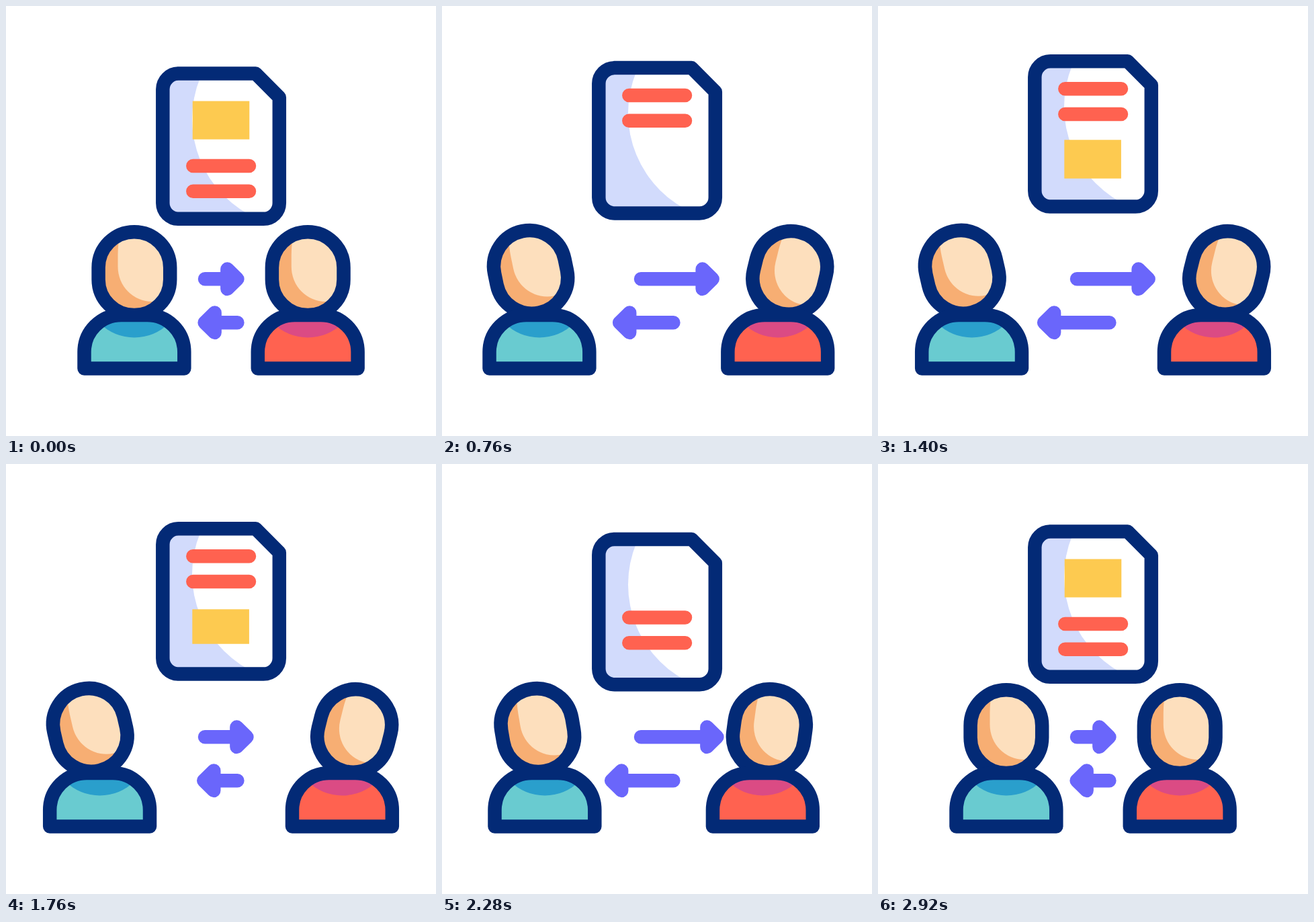
Write an HTML page that moves like this. It is 640 px wide and 640 px high and loops after 3 s.

```html
<!DOCTYPE html>
<html lang="en">
<head>
<meta charset="utf-8">
<title>Document exchange</title>
<style>
  html, body { margin: 0; height: 100%; overflow: hidden; background: #fff; }
  svg { display: block; width: 100vw; height: 100vh; }
  .line { fill: none; stroke: #032a76; stroke-width: 20.5; stroke-linejoin: round; }
  .bar { stroke: #ff6250; stroke-width: 20.5; stroke-linecap: round; }
  .arrow { fill: #6a66fb; stroke: #6a66fb; stroke-width: 20.5; stroke-linecap: round; stroke-linejoin: round; }
  .box { fill: #fdca50; }
</style>
</head>
<body>
<svg viewBox="0 0 640 640">
  <defs>
    <path id="page" d="M256.8 100.5H371.5L406.8 136V293.3a23.5 23.5 0 0 1-23.5 23.5H256.8a23.5 23.5 0 0 1-23.5-23.5V124a23.5 23.5 0 0 1 23.5-23.5Z"/>
    <rect id="skull" x="137.6" y="336.2" width="106.6" height="124" rx="53.3"/>
    <path id="torso" d="M116.5 539.5V515a55 55 0 0 1 55-55H210.3a55 55 0 0 1 55 55V539.5Z"/>
    <clipPath id="pageClip"><use href="#page"/></clipPath>
    <clipPath id="skullClip"><use href="#skull"/></clipPath>
    <clipPath id="torsoClip"><use href="#torso"/></clipPath>
    <g id="head">
      <use href="#skull" fill="#f7ae73"/>
      <path d="M170 335Q166.5 355 166.5 370V388a51 52 0 0 0 51 52H250V335Z" fill="#fddfbd" clip-path="url(#skullClip)"/>
      <use href="#skull" class="line"/>
    </g>
  </defs>

  <g id="doc">
    <use href="#page" fill="#d2dbfc"/>
    <circle cx="439" cy="168" r="162" fill="#fff" clip-path="url(#pageClip)"/>
    <use href="#page" class="line"/>
    <rect id="topBox" class="box" x="277.7" y="141.5" width="84.6" height="57"/>
    <rect id="lowBox" class="box" x="277.3" width="84.6"/>
    <path id="bars" class="bar" d="M278.3 238H362M278.3 275.7H362"/>
  </g>
  <g id="people"></g>
  <path id="rightArrow" class="arrow"/>
  <path id="leftArrow" class="arrow"/>
</svg>
<script>
const LOOP = 3000, STEP = 40;
const $ = id => document.getElementById(id);

const people = [
  { home: 0, shift: -51.3, tilt: -13, pivot: '173 460', out: 280, back: 2080, shirt: '#69cbd0', shade: '#2a9fcc' },
  { home: 258.3, shift: 51.2, tilt: 14, pivot: '205 472', out: 200, back: 2000, shirt: '#ff6250', shade: '#db4b84' }
];

$('people').innerHTML = people.map(p => `<g>
  <use href="#head"/>
  <use href="#torso" fill="${p.shirt}"/>
  <circle cx="191" cy="420.5" r="73" fill="${p.shade}" clip-path="url(#torsoClip)"/>
  <use href="#torso" class="line"/>
</g>`).join('');
people.forEach((p, i) => {
  p.group = $('people').children[i];
  p.head = p.group.firstElementChild;
});

// Eased 0..1 progress of a move.
function ease(t, start, duration) {
  const p = Math.min(1, Math.max(0, (t - start) / duration));
  return p * p * (3 - 2 * p);
}

// Goes to 1 at `out` and returns to 0 at `back`.
const visit = (t, out, back, duration) => ease(t, out, duration) - ease(t, back, duration);

// Three out-and-back strokes of 800 ms.
function pulse(t, start) {
  const local = t - start;
  if (local < 0 || local >= 2400) return 0;
  return visit(local % 800, 0, 400, 400);
}

function arrow(tail, y, tip, dir) {
  const base = tip - 15 * dir;
  return `M${tail} ${y}H${base}M${base} ${y - 14.7}V${y + 14.7}L${tip} ${y}Z`;
}

function draw(t) {
  const lift = -18.2 * ease(t, 400, 760) + 30.4 * ease(t, 1400, 760) - 12.2 * ease(t, 2160, 760);
  $('doc').setAttribute('transform', `translate(0 ${lift})`);
  $('bars').setAttribute('transform', `translate(0 ${-96.5 * visit(t, 200, 2000, 400)})`);
  $('topBox').setAttribute('height', 57 * (1 - visit(t, 200, 2500, 400)));

  const low = 57.5 * visit(t, 880, 1680, 400);
  $('lowBox').setAttribute('y', 246.2 - low / 2);
  $('lowBox').setAttribute('height', low);

  for (const p of people) {
    const k = visit(t, p.out, p.back, 600);
    p.group.setAttribute('transform', `translate(${p.home + p.shift * k} 0)`);
    p.head.setAttribute('transform', `rotate(${p.tilt * k} ${p.pivot})`);
  }

  $('rightArrow').setAttribute('d', arrow(296, 406.3, 344.4 + 65 * pulse(t, 280), 1));
  $('leftArrow').setAttribute('d', arrow(344.4, 471.2, 295.6 - 48.5 * pulse(t, 200), -1));
}

function tick() {
  const t = performance.now() % LOOP;
  draw(Math.floor(t / STEP) * STEP);
  requestAnimationFrame(tick);
}
tick();
</script>
</body>
</html>
```
